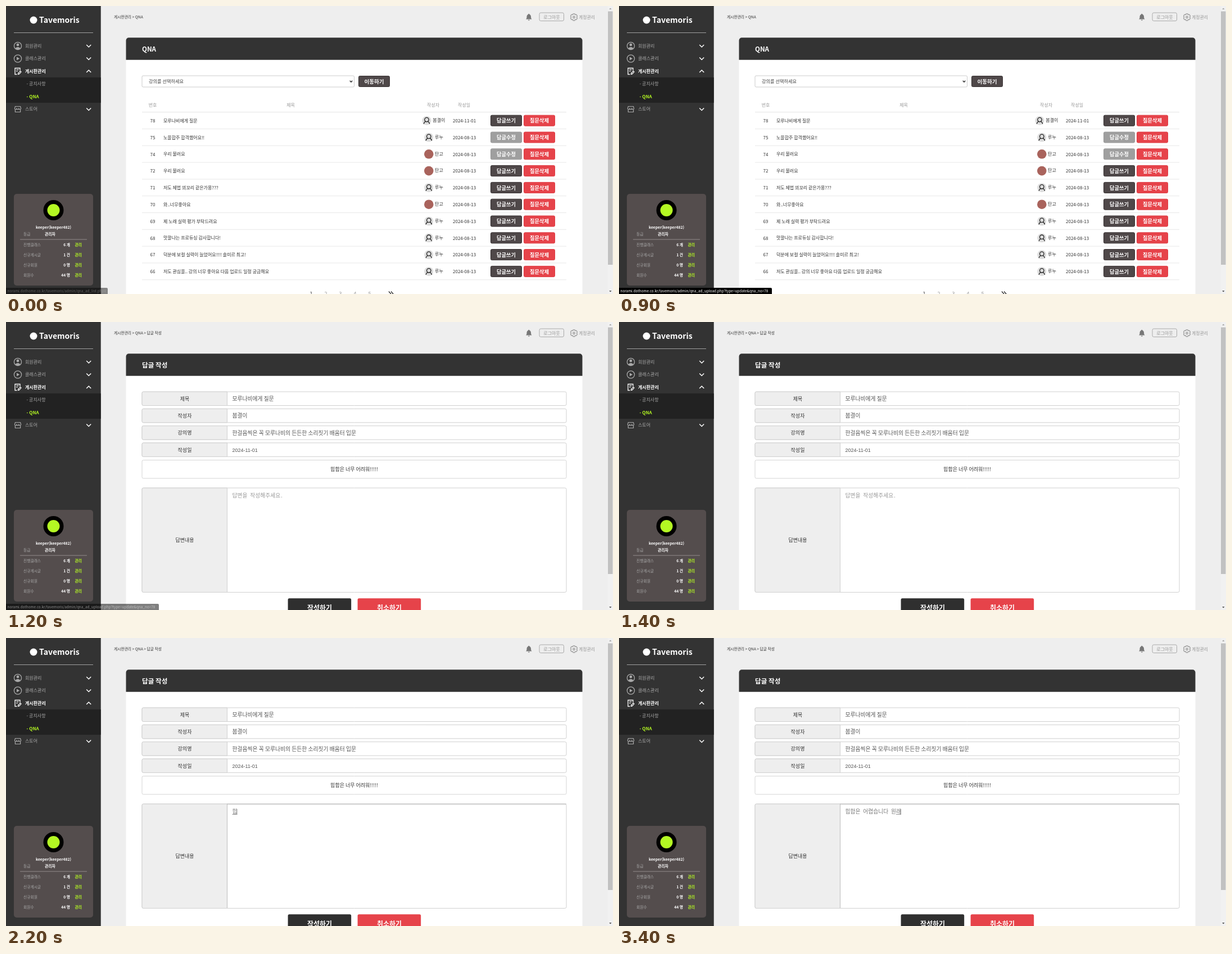
An HTML page with a canvas that plays this animation: 1080 by 512 pixels, repeating every 3600 ms.

```html
<!DOCTYPE html>
<html lang="ko">
<head>
<meta charset="utf-8">
<title>QNA</title>
<style>
html, body { margin: 0; width: 100%; height: 100%; overflow: hidden; background: #eee; }
canvas { display: block; width: 1080px; height: 512px; }
</style>
</head>
<body>
<canvas id="stage"></canvas>
<script>
const W = 1080, H = 512, LOOP = 3600;
const SANS = '"Noto Sans CJK KR", "Noto Sans KR", "Noto Sans CJK", sans-serif';
const MONO = '"Noto Sans Mono CJK KR", "Noto Sans CJK KR", "Noto Sans CJK", monospace';
const ARIAL = '"Liberation Sans", sans-serif';
const GREEN = '#b4f823', RED = '#e6434a', DARK = '#333', GREY = '#a9a9a9';

const canvas = document.getElementById('stage');
const dpr = window.devicePixelRatio || 1;
canvas.width = W * dpr;
canvas.height = H * dpr;
const c = canvas.getContext('2d');

// y is the visual middle of the line
function text(s, x, y, size, color, { weight = 400, align = 'left', font = SANS } = {}) {
  c.font = `${weight} ${size}px ${font}`;
  c.textAlign = align;
  c.fillStyle = color;
  c.fillText(s, x, y + size * 0.37);
}

function box(x, y, w, h, r, fill, stroke) {
  c.beginPath();
  c.roundRect(x, y, w, h, r);
  if (fill) { c.fillStyle = fill; c.fill(); }
  if (stroke) { c.strokeStyle = stroke; c.lineWidth = 1; c.stroke(); }
}

function disc(x, y, r, fill) {
  c.beginPath();
  c.arc(x, y, r, 0, Math.PI * 2);
  c.fillStyle = fill;
  c.fill();
}

function ring(x, y, r, color, width) {
  c.beginPath();
  c.arc(x, y, r, 0, Math.PI * 2);
  c.strokeStyle = color;
  c.lineWidth = width;
  c.stroke();
}

function path(d, x, y, color, width, fill) {
  c.save();
  c.translate(x, y);
  const p = new Path2D(d);
  if (fill) { c.fillStyle = fill; c.fill(p); }
  if (color) {
    c.strokeStyle = color;
    c.lineWidth = width;
    c.stroke(p);
  }
  c.restore();
}

function rule(x1, x2, y, color) {
  c.fillStyle = color;
  c.fillRect(x1, y - 0.5, x2 - x1, 1);
}

function button(label, x, y, w, h, size, fill, edge) {
  box(x + 0.5, y + 0.5, w - 1, h - 1, 2, fill, edge);
  text(label, x + w / 2, y + h / 2 + 0.3, size, '#fff', { weight: 700, align: 'center' });
}

function sidebar() {
  c.fillStyle = DARK;
  c.fillRect(0, 0, 168.75, H);
  disc(49, 25, 6.5, '#fff');
  text('Tavemoris', 59, 25, 14, '#fff', { weight: 700 });
  rule(14, 155, 47.5, '#a0a0a0');
  c.fillStyle = '#222';
  c.fillRect(0, 127, 168.75, 45);

  ring(21, 71, 6.6, GREY, 1.3);
  disc(21, 69, 2.4, GREY);
  path('M-4.4 4.6C-3.5 1 3.5 1 4.4 4.6C2 6.6 -2 6.6 -4.4 4.6Z', 21, 71, null, 0, GREY);
  ring(21, 93.5, 6.6, GREY, 1.3);
  path('M-2 -3L3.2 0L-2 3Z', 21, 93.5, null, 0, GREY);
  path('M4.5 -1.5V-5.5H-4.5V5.5H-1M-2 -2.6H2M-2 0H0M1 5.5L1.4 3L5 -0.4L6.4 1L3 5Z', 20.5, 116, '#fff', 1.3);
  path('M-4.6 -5H4.6L5.6 -1.2C5 1 2.4 1 1.9 -1C1.4 1 -1.4 1 -1.9 -1C-2.4 1 -5 1 -5.6 -1.2ZM-4.6 0.8V5H4.6V0.8', 21, 183.5, GREY, 1.2);

  text('회원관리', 34, 71, 8, GREY);
  text('클래스관리', 34, 93.5, 8, GREY);
  text('게시판관리', 34, 116, 8, '#fff', { weight: 700 });
  text('- 공지사항', 36.5, 138.5, 8, GREY);
  text('- QNA', 36.5, 161.3, 8, GREEN, { weight: 700 });
  text('스토어', 34, 183.5, 8, GREY);
  for (const [y, d] of [[71, 1], [93.5, 1], [116, -1], [183.5, 1]])
    path(`M-4 ${-2 * d}L0 ${2 * d}L4 ${-2 * d}`, 147.2, y, '#fff', 1.5);

  box(14, 334, 141, 163, 5, '#544d4d');
  disc(84.5, 363, 18, '#000');
  disc(84.5, 363, 11, GREEN);
  text('keeper(keeper482)', 84.5, 393.5, 6.75, '#fff', { weight: 700, align: 'center' });
  text('등급', 31, 406, 6.75, GREY);
  text('관리자', 69, 406, 6.75, '#fff', { weight: 700 });
  rule(25, 144, 415, '#918b8b');
  const stats = [['진행클래스', '6 개'], ['신규게시글', '1 건'], ['신규회원', '0 명'], ['회원수', '44 명']];
  stats.forEach(([name, count], i) => {
    const y = 424.5 + 18 * i;
    text(name, 31, y, 6.75, GREY);
    text(count, 114, y, 6.75, '#fff', { weight: 700, align: 'right' });
    text('관리', 122.5, y, 6.75, GREEN, { weight: 700 });
  });
}

function topBar(crumb) {
  text(crumb, 192, 19.5, 6.75, DARK);
  path('M0 -6.2C1 -6.2 1.2 -5.4 1.2 -5C3.4 -4.2 3.8 -2 3.8 0C3.8 2 4.6 2.6 5.4 3.6H-5.4C-4.6 2.6 -3.8 2 -3.8 0C-3.8 -2 -3.4 -4.2 -1.2 -5C-1.2 -5.4 -1 -6.2 0 -6.2ZM-1.6 4.4H1.6C1.4 6.2 -1.4 6.2 -1.6 4.4Z', 930.3, 20, null, 0, '#777');
  box(949, 12, 43.5, 14.5, 2.5, null, '#aaa');
  text('로그아웃', 971, 19.6, 8, '#999', { align: 'center' });
  path('M-1.5 -6H1.5L2 -4.2L4.4 -4.6L6 -1.8L4.8 0L6 1.8L4.4 4.6L2 4.2L1.5 6H-1.5L-2 4.2L-4.4 4.6L-6 1.8L-4.8 0L-6 -1.8L-4.4 -4.6L-2 -4.2Z', 1010.5, 19.8, '#999', 1.2);
  ring(1010.5, 19.8, 1.7, '#999', 1.3);
  text('계정관리', 1019, 19.6, 7.9, '#999');
}

function scrollbar(end) {
  c.fillStyle = '#f1f1f1';
  c.fillRect(1070.5, 0, 9.5, H);
  c.fillStyle = '#c1c1c1';
  c.fillRect(1071, 9.5, 8.4, end - 9.5);
  path('M-2.2 1.2L0 -1.2L2.2 1.2Z', 1075.3, 4.8, null, 0, '#a3a3a3');
  path('M-2.2 -1.2L0 1.2L2.2 -1.2Z', 1075.3, 507.3, null, 0, '#505050');
}

function panel(title) {
  box(213.5, 56.3, 812, 460, [5, 5, 0, 0], '#fff');
  box(213.5, 56.3, 812, 39.5, [5, 5, 0, 0], DARK);
  text(title, 242, 76.3, 11.6, '#fff', { weight: 700 });
}

function person(x, y) {
  disc(x, y, 8, '#dcdcdc');
  ring(x, y - 1.6, 3.7, '#222', 1.3);
  path('M-5.2 6C-5 3.4 -3.6 2.4 -2.2 1.6M5.2 6C5 3.4 3.6 2.4 2.2 1.6', x, y, '#222', 1.3);
}

const posts = [
  [78, '모루나비에게 질문', '봄결이'],
  [75, '노을합주 합격했어요!!', '루누', true],
  [74, '우리 불러요', '탄고', true],
  [72, '우리 불러요', '탄고'],
  [71, '저도 제법 꾀꼬리 같은가용???', '루누'],
  [70, '와..너무좋아요', '탄고'],
  [69, '제 노래 실력 평가 부탁드려요', '루누'],
  [68, '맛깔나는 프로듀싱 감사합니다!', '루누'],
  [67, '덕분에 보컬 실력이 늘었어요!!!! 솔미르 최고!', '루누'],
  [66, '저도 관심을.. 강의 너무 좋아요 다음 업로드 일정 궁금해요', '루누'],
];

function listPage() {
  topBar('게시판관리 > QNA');
  panel('QNA');
  box(242, 124, 377.5, 20, 2, '#fff', '#ccc');
  text('강의를 선택하세요', 254, 133.8, 8.2, '#444');
  path('M-2.2 -1.2L0 1.2L2.2 -1.2', 614, 134, '#222', 1.3);
  button('이동하기', 627, 124, 56, 20, 9.5, '#4f4849', '#393334');

  const center = { align: 'center' };
  text('번호', 261, 176.3, 8, '#999', center);
  text('제목', 506.5, 176.3, 8, '#999', center);
  text('작성자', 760, 176.3, 8, '#999', center);
  text('작성일', 815, 176.3, 8, '#999', center);
  rule(242, 997, 188.7, '#e4e4e4');

  posts.forEach(([no, title, who, answered], i) => {
    const y = 203.7 + 29.8 * i, ax = who.length > 2 ? 748.5 : 752.3;
    text(no, 261, y + 0.3, 8, DARK, center);
    text(title, 280, y + 0.2, 8, DARK);
    if (who === '탄고') disc(ax, y, 8.3, '#a9635c');
    else person(ax, y);
    text(who, ax + 10.8, y - 0.7, 8, DARK);
    text(i ? '2024-08-13' : '2024-11-01', 795, y + 0.3, 8, DARK);
    const top = y - 10;
    if (answered) button('답글수정', 862, top, 56, 20, 9.2, '#9f9f9f', '#9a9a9a');
    else button('답글쓰기', 862, top, 56, 20, 9.2, '#4f4849', '#332d2e');
    button('질문삭제', 921, top, 56, 20, 9.2, RED, '#df3a42');
    rule(242, 997, y + 14.8, '#e8e8e8');
  });

  for (let i = 0; i < 5; i++)
    text(i + 1, 543 + 26 * i, 512, 9, i ? '#999' : DARK, center);
  path('M-4 -4.5L0 0L-4 4.5M0 -4.5L4 0L0 4.5', 685, 512, '#222', 1.3);
  scrollbar(460);
}

function field(label, y, h) {
  box(242, y, 755, h, 2.5, '#fff', '#d0d0d0');
  box(242, y, 151.5, h, [2.5, 0, 0, 2.5], '#eee', '#d0d0d0');
  text(label, 318, y + h / 2 + 0.3, 9, DARK, { align: 'center' });
}

function formPage(t) {
  topBar('게시판관리 > QNA > 답글 작성');
  panel('답글 작성');
  const rows = [
    ['제목', '모루나비에게 질문'],
    ['작성자', '봄결이'],
    ['강의명', '한걸음씩은 꼭 모루나비의 든든한 소리짓기 배움터 입문'],
    ['작성일', '2024-11-01'],
  ];
  rows.forEach(([label, value], i) => {
    const y = 124 + 30.3 * i, date = i === 3;
    field(label, y, 24.5);
    text(value, 402.5, y + 12.5, date ? 9 : 9.8, '#555', { font: date ? ARIAL : SANS });
  });
  box(242, 245.5, 755, 32.5, 2.5, '#fff', '#d5d5d5');
  text('힙합은 너무 어려워!!!!!', 619.5, 262, 9, DARK, { align: 'center' });
  field('답변내용', 295, 185.5);
  if (t >= 1700) {
    c.fillStyle = '#eee';
    c.fillRect(394, 296, 602, 1);
    c.fillStyle = '#bdbdbd';
    c.fillRect(393, 294.5, 604, 1);
    c.fillRect(393, 295, 1, 185);
  }
  answer(t);
  box(501.6, 491.2, 112.6, 40, 2.5, '#2f2f2f');
  box(625.6, 491.2, 112.6, 40, 2.5, RED);
  text('작성하기', 558, 508.5, 12, '#fff', { weight: 700, align: 'center' });
  text('취소하기', 682, 508.5, 12, '#fff', { weight: 700, align: 'center' });
  scrollbar(448);
}

const typing = [
  [1900, 'ㅎ'], [2000, '히'], [2100, '힙'], [2400, '힙하'], [2600, '힙합'],
  [2700, '힙합은'], [2800, '힙합은 어'], [2900, '힙합은 어렵'], [3000, '힙합은 어렵습'],
  [3100, '힙합은 어렵습니다'], [3200, '힙합은 어렵습니다 우'],
  [3300, '힙합은 어렵습니다 원'], [3400, '힙합은 어렵습니다 원래'],
];

function latest(steps, t) {
  let value;
  for (const [at, v] of steps) if (t >= at) value = v;
  return value;
}

function answer(t) {
  const s = latest(typing, t), x = 402.5, size = 9.75;
  if (!s) {
    text('답변을 작성해주세요.', x, 308.7, size, '#999', { font: MONO });
    return;
  }
  text(s, x, 308.7, size, '#777', { font: MONO });
  const end = x + c.measureText(s).width;
  const start = x + c.measureText(s.slice(0, -1)).width;
  c.fillStyle = '#777';
  c.fillRect(start, 313, end - start, 0.8);
  c.fillRect(end - 0.8, 304, 0.7, 9.5);
}

const opacity = [
  [0, 0.45], [100, 0.2], [200, 0], [700, 0.35], [800, 0.8], [900, 1],
  [1200, 0.5], [1300, 0.1], [1400, 0],
];

function status(t) {
  const a = latest(opacity, t);
  if (!a) return;
  const early = t < 500;
  const page = early ? 'list.php#' : 'upload.php?type=update&qna_no=78';
  c.globalAlpha = a;
  box(0, 501, early ? 181 : 272, 12, [0, 2, 0, 0], '#000');
  text('norami.dothome.co.kr/tavemoris/admin/qna_ad_' + page, 2.5, 506.7, 6.4, early ? '#bbb' : '#fff', { weight: 500 });
  c.globalAlpha = 1;
}

function draw(now) {
  const t = now % LOOP;
  c.setTransform(dpr, 0, 0, dpr, 0, 0);
  c.fillStyle = '#eee';
  c.fillRect(0, 0, W, H);
  sidebar();
  if (t < 1000) listPage();
  else formPage(t);
  status(t);
}

const begin = performance.now();
function tick() {
  draw(performance.now() - begin);
  requestAnimationFrame(tick);
}
tick();
</script>
</body>
</html>
```
